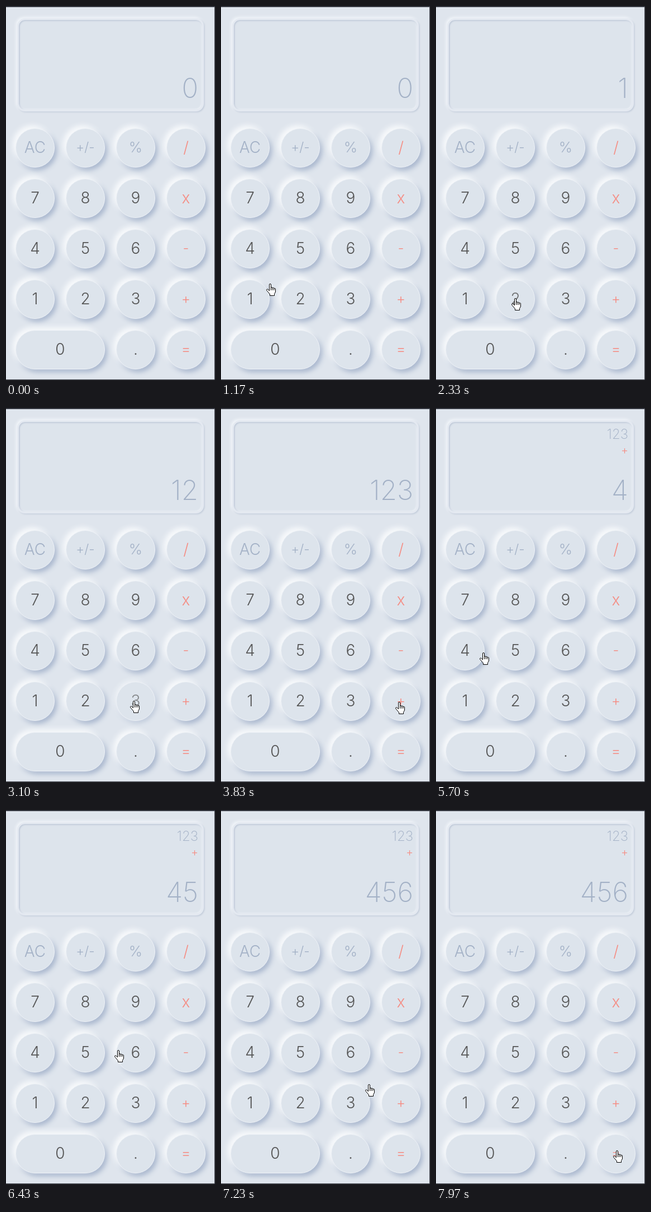
Write an HTML page that moves like this. It is 374 by 667 pixels and loops after 8000 ms.

```html
<!DOCTYPE html>
<html lang="en">
<head>
<meta charset="utf-8">
<title>Calculator</title>
<style>
  html, body { margin: 0; width: 100%; height: 100%; overflow: hidden; }
  body { position: relative; background: #dfe5ed; font: 300 28px Inter, sans-serif; color: #a3b1c6; }
  body::after {
    content: ""; position: absolute; inset: 0; box-sizing: border-box;
    border: solid #343740; border-width: 2px 1px 1px 0;
  }
  #screen {
    position: absolute; left: 20px; top: 22px; width: 334px; height: 166px; box-sizing: border-box;
    border: 3px solid #e4e9f1; border-radius: 14px; background: #dde4ec;
    box-shadow: -2px -2px 5px #f4f7fb, 1px 1px 3px #b4bfd1,
      inset 1px 1px 3px #b4bfd1, inset -1px -1px 3px #f4f7fb;
  }
  .line { position: absolute; right: 30px; line-height: 60px; white-space: pre; }
  #entry { top: 117px; font-size: 49px; font-weight: 200; }
  #stored { top: 17px; font-size: 24px; font-weight: 200; }
  #operator { top: 45px; font-size: 20px; }
  .key {
    position: absolute; height: 70px; box-sizing: border-box; line-height: 66px; text-align: center;
    border: 1px solid #eef2f7; border-radius: 35px; background: #dde4ec;
    box-shadow: calc(-5px * var(--lift)) calc(-5px * var(--lift)) 10px #f8fafc,
      calc(4px * var(--lift)) calc(5px * var(--lift)) 9px #a9b7ce;
  }
  .key span { opacity: calc(.4 + .6 * var(--lift)); }
  .digit { color: #555; }
  .op { color: #f58d84; }
  #hand { position: absolute; left: 0; top: 0; overflow: visible; }
</style>
</head>
<body>
<div id="screen"></div>
<div id="stored" class="line"></div>
<div id="operator" class="line op"></div>
<div id="entry" class="line"></div>
<svg id="hand" width="17" height="22" fill="#fff" stroke="#000" stroke-linejoin="round">
  <path d="M5.5 13V2a1.5 1.5 0 0 1 3 0V8a1.3 1.3 0 0 1 2.7 0v.6a1.3 1.3 0 0 1 2.7.2v.8a1.3 1.3 0 0 1 2.6.4V15l-2 3.5v3h-8V19L1 12.5Q-.2 10.5 1.5 9.8 3 9.5 5.5 13ZM8.5 8v4M11.2 8.6V12M13.9 9.6V12"/>
</svg>
<script>
const LOOP = 8000;
const $ = id => document.getElementById(id);
const hand = $('hand');
const clamp = v => Math.min(1, Math.max(0, v));

const keys = {};
const smaller = { '+/-': 23, '%': 26, '+': 25, '-': 24, '=': 26 };
function addKey(label, col, row, width = 70) {
  const key = document.createElement('div');
  const kind = col === 3 ? 'op' : /[\d.]/.test(label) ? 'digit' : '';
  key.className = 'key ' + kind;
  key.style.cssText = `left:${17 + 90 * col}px;top:${218 + 90 * row}px;width:${width}px;font-size:${smaller[label] || 28}px`;
  key.innerHTML = `<span>${label}</span>`;
  document.body.insertBefore(key, hand);
  keys[label] = key;
}
['AC +/- % /', '7 8 9 x', '4 5 6 -', '1 2 3 +'].forEach((labels, row) =>
  labels.split(' ').forEach((label, col) => addKey(label, col, row)));
addKey('0', 0, 4, 160);
addKey('.', 2, 4);
addKey('=', 3, 4);

// Pointer stops: time, x, y
const path = [
  [900, 215, 448], [1170, 81, 495], [1400, 47, 522], [1730, 47, 522],
  [2200, 135, 521], [2670, 135, 521], [3030, 222, 522], [3370, 222, 522],
  [3830, 312, 524], [3930, 316, 524], [4640, 316, 524], [5000, 57, 482],
  [5140, 37, 472], [5250, 37, 472], [5380, 44, 440], [5560, 44, 440],
  [5900, 134, 430], [6130, 134, 430], [6240, 134, 430], [6430, 194, 428],
  [6550, 221, 422], [6950, 221, 422], [7600, 316, 600], [7830, 317, 607], [8000, 317, 607]
];

// Presses: label, down, up
const presses = [
  ['1', 1550, 1690], ['2', 2310, 2480], ['3', 3060, 3220], ['+', 4030, 4210],
  ['4', 5400, 5530], ['5', 6130, 6240], ['6', 6700, 6860], ['=', 7950, 8100]
];

// Slope that never overshoots; zero at rests and turns
function slope(i, axis) {
  if (!path[i - 1] || !path[i + 1]) return 0;
  const rate = j => (path[j + 1][axis] - path[j][axis]) / (path[j + 1][0] - path[j][0]);
  const a = rate(i - 1), b = rate(i);
  return a * b > 0 ? 2 * a * b / (a + b) : 0;
}

function pointer(t, axis) {
  const i = Math.max(0, path.findIndex(p => p[0] > t) - 1);
  const p = path[i], q = path[i + 1], span = q[0] - p[0];
  const u = clamp((t - p[0]) / span), v = 1 - u;
  return v * v * (1 + 2 * u) * p[axis] + u * u * (3 - 2 * u) * q[axis]
    + span * u * v * (v * slope(i, axis) - u * slope(i + 1, axis));
}

function draw(now) {
  const t = now % LOOP;
  let entry = '', stored = '', operator = '';
  for (const key of Object.values(keys)) key.style.setProperty('--lift', 1);
  for (const [label, down, up] of presses) {
    const depth = clamp((t - down) / 50) - clamp((t - up) / 50);
    keys[label].style.setProperty('--lift', 1 - .7 * depth);
    if (t < up) continue;
    if (label === '+') [stored, operator, entry] = [entry, '+', ''];
    else entry += label;
  }
  $('entry').textContent = entry || '0';
  $('stored').textContent = stored;
  $('operator').textContent = operator;
  hand.style.visibility = t < path[0][0] ? 'hidden' : 'visible';
  hand.style.transform = `translate(${Math.round(pointer(t, 1))}px, ${Math.round(pointer(t, 2))}px)`;
}

const start = performance.now();
function tick() {
  draw(performance.now() - start);
  requestAnimationFrame(tick);
}
tick();
</script>
</body>
</html>
```
